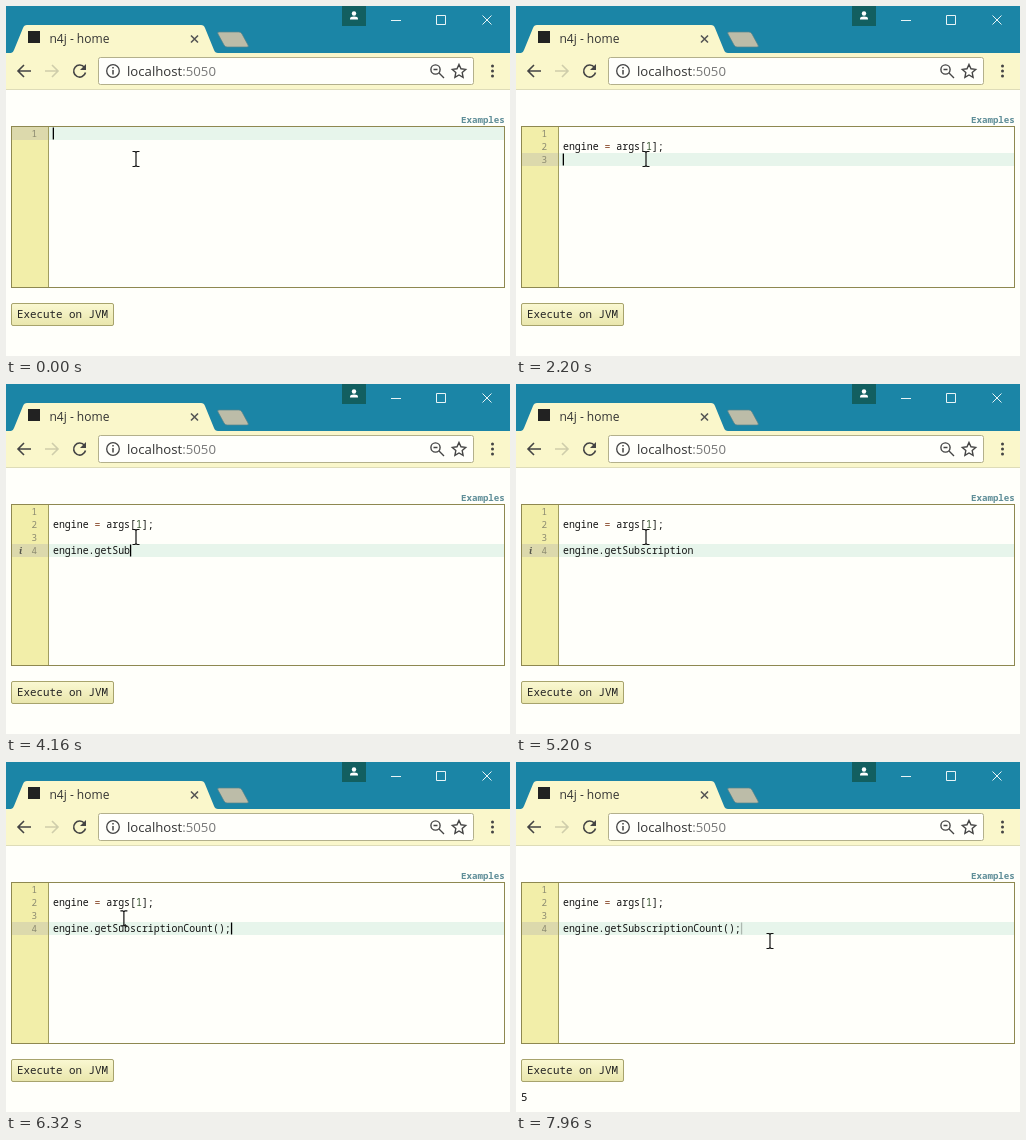
Animation of 504 by 350 pixels, one loop 8000 ms. Source, as an HTML page:

```html
<!DOCTYPE html>
<html lang="en">
<head>
<meta charset="utf-8">
<title>Code editor</title>
<style>
  html, body { margin: 0; width: 100%; height: 100%; overflow: hidden; background: #fffffa; }
  svg { display: block; width: 504px; height: 350px; }
  text { white-space: pre; }
  .ui { font-family: "Open Sans", "Noto Sans", sans-serif; fill: #333; }
  .mono { font-family: "Noto Sans Mono", "DejaVu Sans Mono", monospace; }
  .code { font-size: 9.9px; fill: #111; }
  .number { font-size: 9.3px; fill: #8b8a70; text-anchor: end; }
  .line { fill: none; stroke: #444; stroke-width: 1.6; }
</style>
</head>
<body>
<svg viewBox="0 0 504 350">
  <defs>
    <linearGradient id="buttonFill" x2="0" y2="1">
      <stop stop-color="#faf8d2"/><stop offset="1" stop-color="#e9e6ac"/>
    </linearGradient>
  </defs>
  <rect width="504" height="350" fill="#fffffa"/>

  <!-- Title bar and tabs -->
  <rect width="504" height="47" fill="#1b85a6"/>
  <rect x="336" width="24" height="20" fill="#125f60"/>
  <circle cx="348" cy="7.5" r="2.2" fill="#fff"/>
  <path d="M344 13.5v-1q0-2 4-2t4 2v1z" fill="#fff"/>
  <path d="M385 14.5h10M430.5 9.5h9v9h-9zM476.5 9.500l9 9m0-9l-9 9" fill="none" stroke="#e8f4f6"/>
  <path d="M213 26h20q2 0 3 2l6 11q1 2-1 2h-20q-2 0-3-2l-6-11q-1-2 1-2z" fill="#bcbca8" stroke="#52828a" stroke-width=".7"/>
  <path d="M0 47H5Q7 47 8 44L17 22Q18 19 21 19H195Q198 19 199 22L208 44Q209 47 212 47H504V84H0Z" fill="#faf7cb"/>
  <rect x="22" y="25" width="12" height="12" fill="#222"/>
  <text class="ui" x="43.500" y="37" font-size="12">n4j - home</text>
  <path class="line" d="M185 29.500l7 7m0-7l-7 7" style="stroke:#555"/>

  <!-- Toolbar -->
  <path d="M0 83.500H504" stroke="#dedcb8"/>
  <path class="line" d="M25 65H12m6-6l-6 6 6 6" stroke-width="2"/>
  <path class="line" d="M39 65H52m-6-6l6 6-6 6" style="stroke:#cfcdab"/>
  <path class="line" d="M78.500 61.500a6 6 0 1 0 1 5"/>
  <path d="M80 58v6h-6z" fill="#444"/>
  <rect x="92.500" y="51.500" width="375" height="27" rx="2" fill="#fffffb" stroke="#b3b08c"/>
  <circle class="line" cx="107" cy="65" r="6.300" style="stroke-width:1.300"/>
  <path d="M107 64v4.500M107 61v1.600" stroke="#444" stroke-width="1.500"/>
  <text class="ui" x="121" y="69.500" font-size="13.200">localhost<tspan fill="#777">:5050</tspan></text>
  <g class="line" style="stroke-width:1.400">
    <circle cx="429.500" cy="63.500" r="4.600"/>
    <path d="M433 67l5 5M427.500 63.500h4"/>
    <path d="M453 58.500l2 4.300 4.700.6-3.500 3.200.9 4.700-4.100-2.300-4.100 2.300.9-4.700-3.500-3.200 4.700-.6z"/>
  </g>
  <g fill="#444"><circle cx="486.500" cy="60" r="1.500"/><circle cx="486.500" cy="65" r="1.500"/><circle cx="486.500" cy="70" r="1.500"/></g>

  <!-- Page -->
  <text class="mono" x="455" y="117" font-size="9.150" font-weight="bold" fill="#5f8e98">Examples</text>
  <rect x="6" y="121" width="36" height="160" fill="#f2eea9"/>
  <rect id="activeGutter" x="6" width="36" height="13" fill="#dcd9ac"/>
  <rect id="activeLine" x="43" width="455" height="13" fill="#e7f5eb"/>
  <path d="M42.500 121V281" stroke="#a19d60"/>
  <rect x="5.500" y="120.500" width="493" height="161" fill="none" stroke="#8e8850"/>
  <g id="editorText"></g>
  <text id="info" x="13" font-family="'Noto Serif', serif" font-size="9" font-weight="bold" font-style="italic" fill="#55544a">i</text>
  <rect id="caret" width="1.300" height="12" fill="#000"/>
  <rect id="button" x="5.500" y="297.500" width="102" height="22" rx="1.500" fill="url(#buttonFill)" stroke="#a7a36c"/>
  <text class="mono" x="11" y="312" font-size="10.850" fill="#222">Execute on JVM</text>
  <text id="result" class="mono" x="5" y="339" font-size="10.850" fill="#111">5</text>

  <path id="beam" d="M-3.500-7.500h2.500l1 1 1-1h2.500M0-6.500v13M-3.500 7.500h2.500l1-1 1 1h2.500" fill="none" stroke="#111" stroke-width="1.200"/>
  <path id="arrow" d="M0 0v15l3.500-3.300 2.500 5.500 2.200-1-2.500-5.300h4.800z" fill="#fff" stroke="#111"/>
</svg>
<script>
const LOOP = 8000, LEFT = 47, CHAR = 5.94, CLICK = 7080;
const byId = id => document.getElementById(id);
const set = (id, attributes) => {
  for (const name in attributes) byId(id).setAttribute(name, attributes[name]);
};
const show = (id, visible) => set(id, { visibility: visible ? "visible" : "hidden" });
const lineTop = line => 121 + 13 * line;

// Bursts of typing: start, time per key, keys
const bursts = [
  [520, 80, "\nengine"], [1160, 75, " = args[1];"], [2080, 320, "\n\n"],
  [2720, 112, "engine.getSub"], [4200, 52, "scription"], [5300, 105, "Count();"]
];
const keys = bursts.flatMap(([start, step, text]) =>
  [...text].map((key, i) => ({ key, time: start + i * step })));

const mousePath = [
  [6200, 130, 153], [6320, 118, 156], [6720, 74, 285], [6900, 66, 306],
  [7440, 66, 306], [7600, 86, 295], [7900, 254, 179]
];

function mouseAt(time) {
  const next = mousePath.findIndex(point => point[0] > time);
  if (next === 0) return mousePath[0].slice(1);
  if (next < 0) return mousePath.at(-1).slice(1);
  const [t0, x0, y0] = mousePath[next - 1], [t1, x1, y1] = mousePath[next];
  const k = (time - t0) / (t1 - t0);
  return [x0 + (x1 - x0) * k, y0 + (y1 - y0) * k];
}

// The editor adds the closing bracket as soon as one is opened.
function closeBracket(text) {
  if (text.includes("[") && !text.includes("]")) return text + "]";
  if (text.includes("(") && !text.includes(")")) return text + ")";
  return text;
}

const colour = text => text
  .replace("=", '<tspan fill="#8a4a2c">=</tspan>')
  .replace("[1", '[<tspan fill="#34552c">1</tspan>');

function draw(time) {
  const typed = keys.filter(key => key.time <= time);
  const lines = typed.map(key => key.key).join("").split("\n");
  const last = lines.length - 1, top = lineTop(last);

  const markup = lines.map((text, i) => {
    const y = lineTop(i) + 9.8;
    return `<text class="mono number" x="31" y="${y}">${i + 1}</text>` +
      `<text class="mono code" x="${LEFT}" y="${y}">${colour(closeBracket(text))}</text>`;
  }).join("");
  if (byId("editorText").innerHTML !== markup) byId("editorText").innerHTML = markup;

  set("activeGutter", { y: top });
  set("activeLine", { y: top });
  set("info", { y: top + 9.5 });
  show("info", (time >= 960 && time < 2080) || (time >= 3200 && time < 6240));

  const focused = time < CLICK;
  const idle = time - (typed.length ? typed.at(-1).time : 0);
  set("caret", { x: LEFT + lines[last].length * CHAR - .3, y: top + .5, opacity: focused ? 1 : .25 });
  show("caret", !focused || idle % 1000 < 500);

  const [x, y] = mouseAt(time);
  const inEditor = x > 43 && y > 121 && y < 281;
  const place = `translate(${x} ${y})`;
  set("beam", { transform: place });
  set("arrow", { transform: place });
  show("beam", inEditor);
  show("arrow", !inEditor);

  const hover = x > 5 && x < 108 && y > 297 && y < 320;
  set("button", { stroke: hover ? "#77744a" : "#a7a36c" });
  show("result", time >= CLICK + 160);
}

const start = performance.now();
function tick() {
  draw((performance.now() - start) % LOOP);
  requestAnimationFrame(tick);
}
tick();
</script>
</body>
</html>
```
